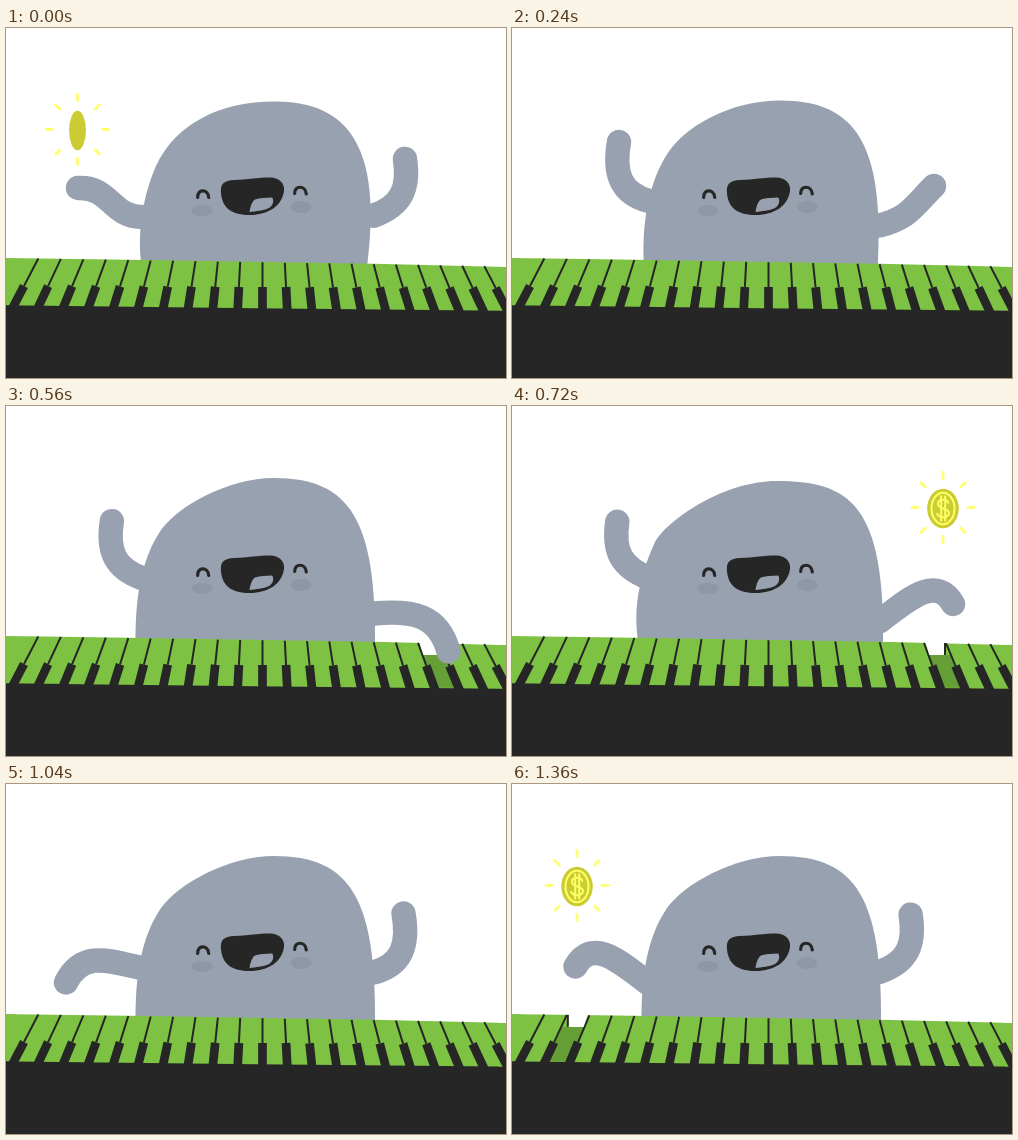
An HTML page for the animation above (1.44 s loop, 500 by 350 pixels).

```html
<!DOCTYPE html>
<html lang="en">
<head>
<meta charset="utf-8">
<title>Piano blob</title>
<style>
  html, body { margin: 0; width: 100%; height: 100%; overflow: hidden; background: #fff; }
  svg { display: block; width: 500px; height: 350px; }
</style>
</head>
<body>
<svg viewBox="0 0 500 350" width="500" height="350">
  <path id="body" fill="#98a1af"/>
  <g id="face">
    <ellipse cx="196" cy="182.5" rx="10.5" ry="5.5" fill="#8e97a6"/>
    <ellipse cx="295.2" cy="179" rx="10.3" ry="6" fill="#8e97a6"/>
    <g fill="none" stroke="#262626" stroke-width="3.2" stroke-linecap="round">
      <path d="M191.700 169.500C191 161 202 160.500 202.700 169.500"/>
      <path d="M288.700 165.500C288 157.300 299.500 156.800 300.300 166"/>
    </g>
    <path fill="#262626" d="M215 165C214 156 218 152.500 228 152C242 151.500 252 149.500 264 149.500C274 149.500 279 156 278 163C276 178 262 187 244 187C226 187 216 180 215 165Z"/>
    <path fill="#98a1af" d="M243.500 184C244.500 178 246 173.500 249 171.500C254 169.500 260 170 266 169.500C268.500 172 267 178 263 180C257 183 250 183 243.500 184Z"/>
  </g>
  <path fill="#262626" d="M0 270L500 275V350H0Z"/>
  <path fill="#7dc242" d="M0 230L140 232L368 235.800L500 239V282.700L250 280.200L0 277.300Z"/>
  <path id="shade" fill="#669f36"/>
  <path id="lines" fill="none" stroke="#262626" stroke-width="2"/>
  <path id="blacks" fill="none" stroke="#262626" stroke-width="8.7"/>
  <path id="gap" fill="#fff"/>
  <path id="gapSide" stroke="#262626" stroke-width="2"/>
  <g fill="none" stroke="#98a1af" stroke-width="24.4" stroke-linecap="round">
    <path id="armL"/>
    <path id="armR" transform="matrix(-1 0 0 1 504.5 15.5)"/>
  </g>
  <g id="coin">
    <path id="rays" stroke="#ffff70" stroke-width="2.800" stroke-linecap="round"/>
    <ellipse id="disc" ry="19.700" fill="#cbcb33"/>
    <g id="sign" fill="none" stroke="#ffff66" stroke-width="2">
      <ellipse rx="11.500" ry="15.700"/>
      <path d="M5.500 -5C4.500 -10 -5 -10 -5 -4.500C-5 1 6 -.5 6 4.500C6 10 -5 10 -6 4.500M-1.800 -13V13M2.200 -13V13"/>
    </g>
  </g>
</svg>
<script>
const STEP = 80, COUNT = 18, KEYS = 21;
const LAG = 8; // steps by which the left arm trails the right

// Body: start point, then three curves (left side, left dome, right dome)
const round = [136,240, 130,205, 138,165, 150,138, 170,95, 215,73.5, 268,73.5, 342,73, 377,118, 361,240];
const rest = [129.5,240, 129,195, 134,155, 155,124, 172,100, 222,72, 268,72, 345,72, 370,115, 369,240];
const squash = [127,240, 122,215, 122,180, 144,134, 160,110, 215,75, 264,75, 338,75, 373,98, 371,240];
const bodyKeys = { 0: round, 5: rest, 7: rest, 9: squash, 11: rest, 17: rest };

// Arm: shoulder height, shoulder angle, hand x, hand y, wrist angle
const armKeys = {
  0: [189, 0, 72, 160, -3],
  1: [186, 0, 79, 134.5, 90],
  2: [185, 25, 91.5, 132, 90],
  3: [173, 15, 107, 114, 100],
  10: [172, 22, 105, 116, 98],
  11: [182, 15, 82.5, 142.5, 45],
  13: [184.5, 13, 60, 198.5, -63],
  15: [192, 5, 62, 230, -75],
  17: [200, 37, 63.5, 182.5, -60]
};

const set = (id, attrs) => {
  for (const k in attrs) document.getElementById(id).setAttribute(k, attrs[k]);
};
const polygon = pts => 'M' + pts.map(p => p.join(' ')).join('L') + 'Z';

// Pose at step n, blended between the nearest keys around the loop
function pose(keys, n) {
  const at = Object.keys(keys).map(Number);
  const a = Math.max(...at.filter(k => k <= n));
  const b = at.find(k => k > n) ?? COUNT;
  const u = (n - a) / (b - a), to = keys[b % COUNT];
  return keys[a].map((v, i) => v + (to[i] - v) * u);
}

function bodyPath(n) {
  const [x, y, ...curves] = pose(bodyKeys, n);
  return `M${x} ${y}C${curves.join(' ')}Z`;
}

function armPath(n) {
  const [sy, lift, x, y, wrist] = pose(armKeys, n % COUNT);
  const sx = 137, reach = 0.46 * Math.hypot(x - sx, y - sy), rad = Math.PI / 180;
  const c1 = [sx - reach * Math.cos(lift * rad), sy - reach * Math.sin(lift * rad)];
  const c2 = [x + reach * Math.cos(wrist * rad), y + reach * Math.sin(wrist * rad)];
  return `M${sx} ${sy}C${[...c1, ...c2, x, y].join(' ')}`;
}

// Key edges fan out from the middle of the keyboard
const topY = i => 230.5 + 0.38 * i;
function keyX(i, y) {
  const k = i - 10;
  return 256.5 + k * (22.3 + 0.052 * (y - topY(i))) - 0.012 * k * k;
}

function layKeys() {
  let lines = '', blacks = '';
  const seg = (i, a, b) => `M${keyX(i, a)} ${a}L${keyX(i, b)} ${b}`;
  for (let i = 0; i < KEYS; i++) {
    const mid = 258 + 0.1 * i;
    lines += seg(i, topY(i), mid);
    blacks += seg(i, mid, 285);
  }
  set('lines', { d: lines });
  set('blacks', { d: blacks });
}

function pressKey(i) {
  if (i < 0) {
    for (const id of ['shade', 'gap', 'gapSide']) set(id, { d: '' });
    return;
  }
  const left = i < 10, top = topY(i), dip = top + 12, low = 277.5 + 0.25 * i;
  const xa = keyX(i, top) + 1, xb = keyX(i + 1, top) - 1;
  const da = left ? xa : keyX(i, dip) + 1, db = left ? keyX(i + 1, dip) - 1 : xb;
  const side = left ? xa : xb;
  set('shade', { d: polygon([[keyX(i, dip), dip], [keyX(i + 1, dip), dip], [keyX(i + 1, low), low], [keyX(i, low), low]]) });
  set('gap', { d: polygon([[xa, top - 2], [xb, top - 2], [db, dip], [da, dip]]) });
  set('gapSide', { d: `M${side} ${top}V${dip}` });
}

function drawCoin(n) {
  const right = n >= 8 && n <= 12, left = n >= 16 || n <= 2;
  const wide = n % 2 === 1;
  const x = right ? 431 : n >= 16 ? 65 : 71.5;
  set('coin', { transform: `translate(${x} 102.5)`, display: left || right ? 'inline' : 'none' });
  set('disc', { rx: wide ? 15.8 : 8.4 });
  set('sign', { display: wide ? 'inline' : 'none' });
  let rays = '';
  for (let a = 0; a < 8; a++) {
    const c = Math.cos(a * Math.PI / 4), s = Math.sin(a * Math.PI / 4);
    const ray = [25, 31].map(r => `${r * c} ${(r + 4) * s - 1}`);
    rays += 'M' + ray.join('L');
  }
  set('rays', { d: rays });
}

function draw(n) {
  set('body', { d: bodyPath(n) });
  set('armL', { d: armPath(n) });
  set('armR', { d: armPath(n + LAG) });
  pressKey(n >= 15 ? 1 : n >= 7 && n <= 9 ? 17 : -1);
  drawCoin(n);
}

layKeys();
const start = performance.now();
let shown = -1;
function tick() {
  const n = Math.floor((performance.now() - start) / STEP) % COUNT;
  if (n !== shown) draw(shown = n);
  requestAnimationFrame(tick);
}
tick();
</script>
</body>
</html>
```
